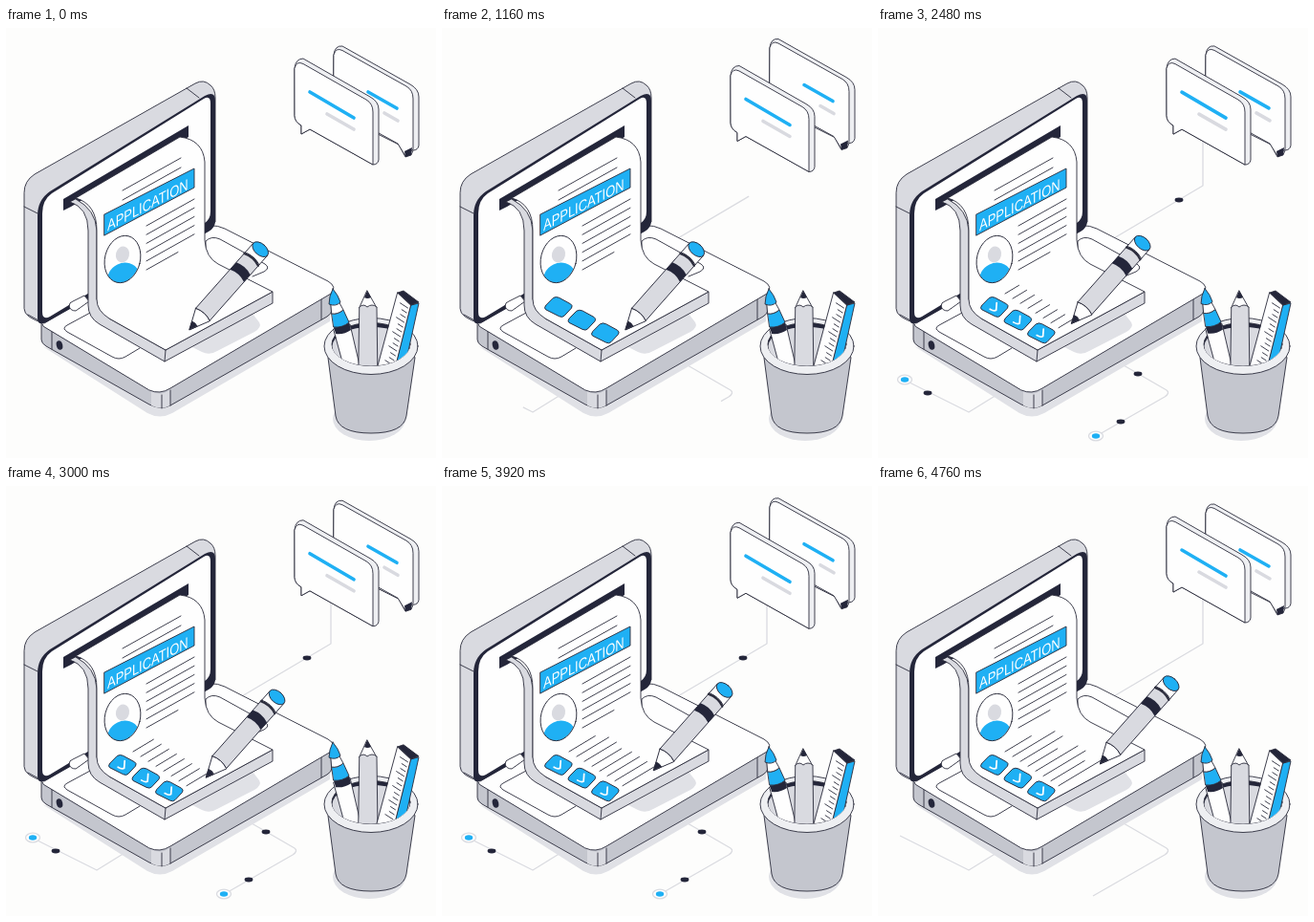
An HTML page for the animation above (4.8 s loop, 450 by 450 pixels).

```html
<!DOCTYPE html>
<html lang="en">
<head>
<meta charset="utf-8">
<title>Application form</title>
<style>
html, body { margin: 0; width: 100%; height: 100%; overflow: hidden; background: #fdfdfc; }
svg { display: block; width: 100%; height: 100%; }
.o { stroke: #2b2c3c; stroke-width: .9; stroke-linejoin: round; stroke-linecap: round; }
.n { fill: none; }
.w { fill: #fefefe; }
.p { fill: #eeeff2; }
.b { fill: #d9dae0; }
.g { fill: #c4c6ce; }
.k { fill: #24263a; }
.c { fill: #1fb0f4; }
.s { fill: #e0e1e6; }
.link { fill: none; stroke: #dadbe0; stroke-width: 1.3; stroke-linejoin: round; }
.bar { fill: none; stroke-width: 3.6; stroke-linecap: round; }
</style>
</head>
<body>
<svg viewBox="0 0 450 450">
  <g id="links">
    <path class="link" d="M235 227L340 165V70"/>
    <path class="link" d="M150 368L95 402L23 366"/>
    <path class="link" d="M238 342L302 379Q306 382 300 386L225 429"/>
  </g>
  <g id="marks"></g>

  <!-- laptop base -->
  <path class="s" d="M38 333L148 403Q161 410 174 403L339 307V290L160 380Z"/>
  <path class="o g" d="M37 308V326Q37 330 42 333L150 394Q162 400 172 395L336 302Q341 299 341 295V274Z"/>
  <path class="b" d="M152 380Q163 386 172 378V395Q162 400 152 395Z"/>
  <path class="o n" d="M163 384V398M172 379V395M330 284V305M48 317V336"/>
  <path class="o w" d="M39 312Q35 306 43 301L200 211Q214 203 229 210L337 265Q347 271 340 278L172 377Q161 384 150 379Z"/>
  <ellipse class="k" cx="56" cy="332" rx="3.2" ry="4.8" transform="rotate(-15 56 332)"/>
  <path class="o n" d="M88 298L64 311Q58 314 64 318L111 344Q118 348 125 344L140 335M209 232V223Q215 217 224 221L271 247Q277 251 270 255L258 260"/>
  <path class="s" d="M195 334L205 339Q213 343 221 338L260 318Q268 313 265 308L258 299Z"/>

  <!-- screen -->
  <path class="o b" d="M19 172Q19 160 30 153L198 58Q207 53 214 60Q219 64 219 73V203L40 309Q19 303 19 294Z"/>
  <path class="o n" d="M19 187L33 194M189 63L202 73M23 300L34 306"/>
  <path class="k" d="M33 304V196Q33 180 46 171L208 71Q219 65 219 76V202Q219 209 212 213L42 308Q33 312 33 304Z"/>
  <path class="w" d="M38 297V194Q38 180 48 173L207 74Q214 70 214 79V192Q214 200 208 204L46 302Q38 306 38 297Z"/>
  <path class="o w" d="M66 291Q66 287 70 286L82 280L87 286L73 296Q67 296 66 291Z"/>
  <path class="k" d="M60 179L191 102V114L68 187L60 191Z"/>

  <!-- form -->
  <path class="o b" d="M67 182Q86 188 86 212V290Q86 303 98 310L166 349L279 288V276L167 337L108 304L95 284V212Q94 190 73 179Z"/>
  <path class="o w" d="M73 178L182 114Q206 117 208 140V222Q209 240 222 247L279 276L167 337L108 304Q95 296 95 284V212Q95 184 73 178Z"/>
  <path class="o n" d="M167 337L166 349M122 170L183 136M122 180L183 146"/>
  <path class="o c" d="M103 195L197 147V167L103 217Z"/>
  <text fill="#fefefe" font-family="'Liberation Sans', Arial, sans-serif" font-size="16" transform="matrix(.81 -.42 0 1 106 212.500)">APPLICATION</text>
  <g id="rows"></g>
  <clipPath id="face"><ellipse cx="122" cy="242" rx="18" ry="25" transform="rotate(14 122 242)"/></clipPath>
  <g clip-path="url(#face)">
    <path class="w" d="M95 210H150V275H95Z"/>
    <ellipse class="c" cx="123" cy="261" rx="17" ry="15" transform="rotate(-25 123 261)"/>
    <ellipse class="b" cx="122" cy="237" rx="7" ry="8.500" transform="rotate(14 122 237)"/>
  </g>
  <ellipse class="o n" cx="122" cy="242" rx="18.500" ry="25" transform="rotate(14 122 242)"/>
  <g id="boxes"></g>
  <g id="lines"></g>

  <!-- writing pencil, drawn along x from its tip -->
  <g id="pen">
    <path class="o w" d="M0 0L21 -9.800Q25 0 21 9.800Z"/>
    <path class="o k" d="M0 0L8 -3.600Q9.500 0 8 3.600Z"/>
    <path class="o b" d="M21 -9.800H100V9.800H21Q25 0 21 -9.800Z"/>
    <path class="k" d="M75 -9.800H85Q89 0 85 9.800H75Q79 0 75 -9.800Z"/>
    <path class="o w" d="M99 -9.800H112V9.800H99Q103 0 99 -9.800Z"/>
    <path class="o n" d="M97.500 -9.800Q101.500 0 97.500 9.800" style="stroke-width:2"/>
    <ellipse class="o c" cx="112" cy="0" rx="6" ry="9.800"/>
  </g>

  <!-- speech bubbles -->
  <g id="back">
    <path class="o p" d="M343 28Q344 18 352 19L423 59Q432 64 432 72V123Q431 128 426 128L424 133L418 135L411 122L343 88Z"/>
    <path class="o w" d="M343 28Q345 20 352 23.500L419 61Q426 65 426 74V127L418 134L410 121L343 84Z"/>
    <path class="k" d="M417 129L425 125L424 133L418 135Z"/>
    <path class="bar" stroke="#1fb0f4" d="M379 67L409 84"/>
    <path class="bar" stroke="#d9dae0" d="M396 89L410 97"/>
  </g>
  <g id="front">
    <path class="o p" d="M302 42Q303 32 311 32L381 72Q390 77 390 85V138Q389 143 384 143L318 106L309 111V102Q302 98 302 92Z"/>
    <path class="o w" d="M302 42Q304 34 311 37.500L377 75Q384 79 384 88V143L318 106L309 111V102Q302 98 302 92Z"/>
    <path class="bar" stroke="#1fb0f4" d="M318 67L364 94"/>
    <path class="bar" stroke="#d9dae0" d="M336 90L364 106"/>
  </g>

  <!-- cup -->
  <ellipse class="s" cx="380" cy="409" rx="38" ry="23"/>
  <path class="o g" d="M337 345L345 406Q348 424 382 424Q416 424 419 406L428 345Z"/>
  <ellipse class="o p" cx="382" cy="333" rx="49" ry="29.500"/>
  <ellipse class="o k" cx="382" cy="331" rx="41" ry="22.500"/>
  <ellipse class="b" cx="382" cy="333" rx="40.500" ry="20.200"/>
  <clipPath id="mouth"><path d="M320 240H450V331H423A41 22.500 0 0 1 341 331H320Z"/></clipPath>
  <g clip-path="url(#mouth)">
    <g id="brush">
      <path class="o w" d="M343 315L360 310L374 370H358Z"/>
      <path class="k" d="M343 313Q352 314 359 308L361 316Q354 321 345 320Z"/>
      <path class="o c" d="M341 299Q347 300 353 295L359 308Q352 314 343 313Z"/>
      <path class="o w" d="M340 288Q345 290 348 286L353 295Q347 300 341 299Z"/>
      <path class="o c" d="M342 273Q348 280 350 287Q345 292 338 289Q338 281 342 273Z"/>
    </g>
    <g id="pencil">
      <path class="o w" d="M378 275L388 293H370Z"/>
      <path class="k" d="M378 275L382 282Q378 284 375 282Z"/>
      <path class="o b" d="M370 292Q374 288 378 292Q383 288 388 292L389 370H369Z"/>
    </g>
    <g id="ruler">
      <path class="o w" d="M410 277L424 290L404 370L386 366Z"/>
      <path class="o c" d="M424 290L432 288L414 370H404Z"/>
      <path class="o k" d="M410 277L416 275L432 287L424 290Z"/>
      <g id="ticks"></g>
    </g>
  </g>
</svg>
<script>
const LOOP = 4800;
const $ = id => document.getElementById(id);
const clamp = v => Math.max(0, Math.min(1, v));
const span = (t, a, d) => clamp((t - a) / d);
const backOut = p => 1 + 2.7 * (p - 1) ** 3 + 1.7 * (p - 1) ** 2;
const move = (id, x, y, rest = '') => $(id).setAttribute('transform', `translate(${x} ${y}) ${rest}`);

function add(parent, tag, attrs) {
  const el = document.createElementNS('http://www.w3.org/2000/svg', tag);
  for (const k in attrs) el.setAttribute(k, attrs[k]);
  return parent.appendChild(el);
}

for (let i = 0; i < 6; i++) {
  const end = i < 5 ? 197 : 180, y = 207 + i * 9.2;
  add($('rows'), 'path', { class: 'o', d: `M147 ${y}L${end} ${y - (end - 147) * .56}` });
}
for (let i = 0; i < 13; i++) {
  const x = 420.5 - i * 1.3, y = 293 + i * 5, w = i % 3 ? 5 : 8;
  add($('ticks'), 'path', { class: 'o', d: `M${x} ${y}l${-w} ${-w * .65}` });
}

const boxes = [0, 1, 2].map(i => {
  const g = add($('boxes'), 'g', {});
  add(g, 'path', { class: 'o c', d: 'M-4.500 -9Q-2 -10.500 1 -9L12 -3Q14.500 -1.500 13 1L6 8.500Q4 10.500 1 9L-12 2.500Q-14 1 -12 -1.500Z' });
  const tick = add(g, 'path', {
    d: 'M-4 2Q0 4.500 2 3L2.500 -4', fill: 'none', stroke: '#fefefe', 'stroke-width': 1.6,
    'stroke-linecap': 'round', pathLength: 1, 'stroke-dasharray': '1 2'
  });
  return { g, tick, x: 121.5 + i * 24.5, y: 292 + i * 13.7 };
});

const reach = [.62, 1, 1, .7, 1, 1, .8, 1];
const lines = reach.map(() => add($('lines'), 'path', { class: 'o' }));

const marks = [[315, 180], [52, 382], [272, 362], [254, 412], [28, 368, 1], [228, 427, 1]].map(([x, y, node]) => {
  const g = add($('marks'), 'g', {});
  if (node) {
    add(g, 'ellipse', { rx: 7.5, ry: 4.8, fill: '#fefefe', stroke: '#dadbe0', 'stroke-width': 1.3 });
    add(g, 'ellipse', { rx: 4.2, ry: 2.7, class: 'c' });
  } else add(g, 'ellipse', { rx: 4.4, ry: 2.4, class: 'k' });
  return { g, x, y, node };
});

const links = [...$('links').children].map(el => ({ el, len: el.getTotalLength() }));
const speeds = [.1, .076, .092];

function hop(id, t, start, dur, height) {
  const p = span(t % 2400, start, dur);
  move(id, 0, -height * Math.sin(Math.PI * p) ** 2);
}

function draw(t) {
  const bob = (1 - Math.cos(2 * Math.PI * t / 2400)) / 2;
  move('front', 0, 7.5 * bob);
  move('back', 0, -7.5 * bob);
  hop('brush', t, 0, 900, 6.5);
  hop('pencil', t, 150, 900, 9);
  hop('ruler', t, 350, 800, 6);

  links.forEach(({ el, len }, i) => {
    const shown = Math.min(len, Math.max(0, t - 160) * speeds[i]);
    el.style.display = shown ? '' : 'none';
    el.setAttribute('stroke-dasharray', `${shown} ${len + 9}`);
  });
  marks.forEach(({ g, x, y, node }) => {
    const s = backOut(span(t, node ? 2000 : 2150, 350)) * (1 - span(t, 4520, 220));
    g.setAttribute('transform', `translate(${x} ${y}) scale(${Math.max(0, s)})`);
  });
  boxes.forEach(({ g, tick, x, y }, i) => {
    const s = 1.08 * Math.max(0, backOut(span(t, 330 + i * 95, 500)));
    g.setAttribute('transform', `translate(${x} ${y}) scale(${s})`);
    const p = span(t, 1250 + i * 130, 300);
    tick.style.display = p ? '' : 'none';
    tick.setAttribute('stroke-dashoffset', 1 - p);
  });

  const p = span(t, 1680, 3080);
  lines.forEach((el, i) => {
    const w = Math.min(4 + 40.5 * p, 44 * reach[i]);
    el.style.display = p ? '' : 'none';
    el.setAttribute('d', `M${133 + i * 8} ${278 + i * 5.1}l${w} ${-w * .6}`);
  });
  move('pen', 192 + 40.5 * p, 315.5 - 25 * p, 'rotate(-48.5)');
}

function tick() {
  draw(performance.now() % LOOP);
  requestAnimationFrame(tick);
}
tick();
</script>
</body>
</html>
```
